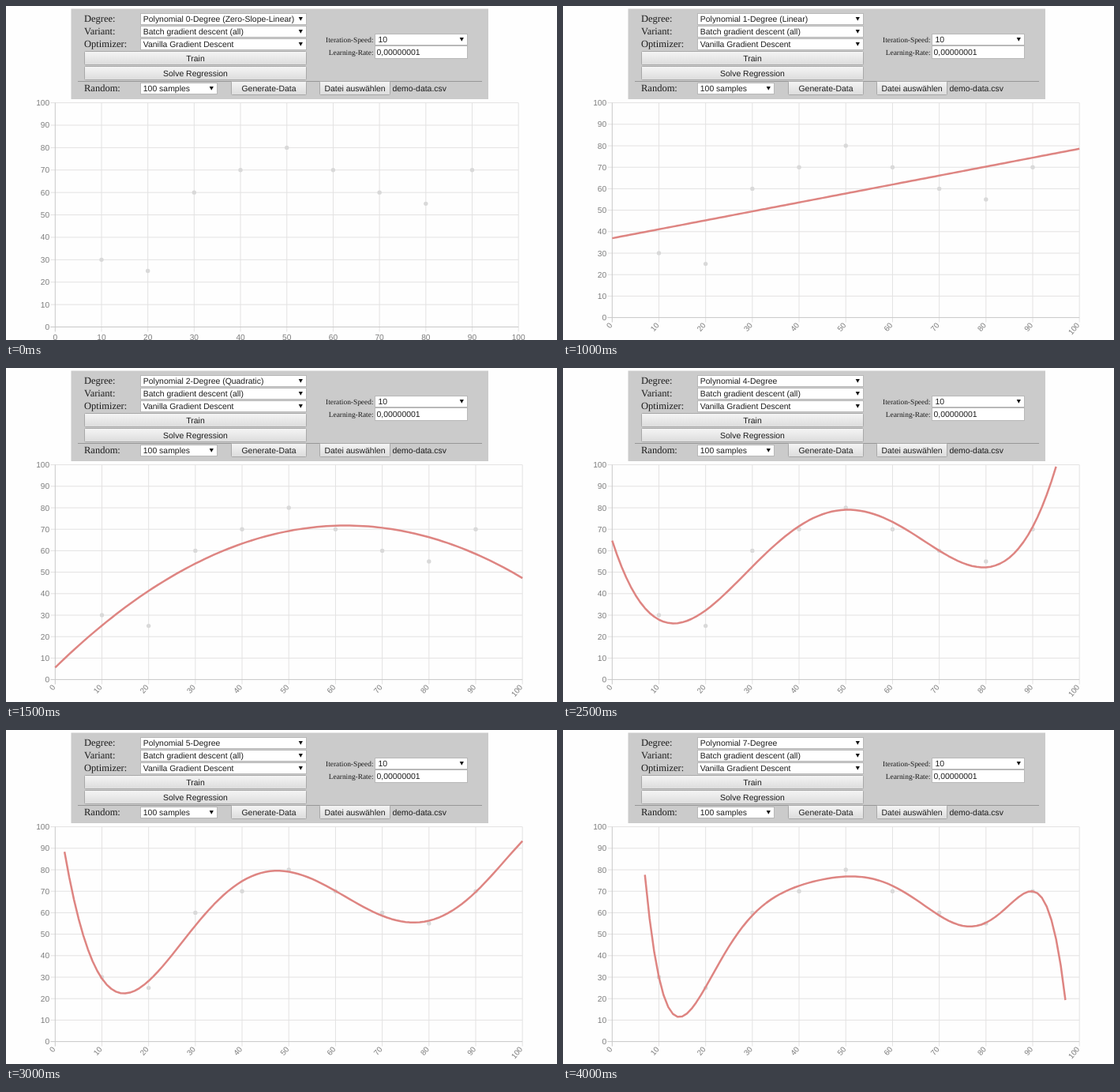
An HTML page that plays this animation: 698x423 px, repeating every 4.5 s.

```html
<!DOCTYPE html>
<html lang="en">
<head>
<meta charset="utf-8">
<title>Polynomial regression</title>
<style>
  html, body { margin: 0; width: 100%; height: 100%; overflow: hidden; background: #fefefe; }
  svg { display: block; }
  text { font: 10.45px Arial, "Liberation Sans", sans-serif; fill: #1c1c1c; white-space: pre; text-rendering: geometricPrecision; }
  .label { font: 12.5px "Times New Roman", "Liberation Serif", serif; }
  .small { font-size: 9.4px; }
  .tick { font-size: 10.2px; fill: #7c7c7c; }
  .slanted { font-size: 9.7px; }
  .grid { stroke: #e3e2e2; }
  .axis { stroke: #c8c8c8; }
  .rule { stroke: #979797; }
</style>
</head>
<body>
<svg id="stage" width="698" height="423" viewBox="0 0 698 423">
  <defs>
    <linearGradient id="face" x2="0" y2="1">
      <stop stop-color="#f5f5f5"/><stop offset="1" stop-color="#dcdcdc"/>
    </linearGradient>
  </defs>
</svg>
<script>
const STEP = 500, DEGREES = 8;
const LEFT = 62.3, TOP = 122.6;
const samples = [30, 25, 60, 70, 80, 70, 60, 55, 70].map((y, i) => [10 * (i + 1), y]);
const suffixes = [" (Zero-Slope-Linear)", " (Linear)", " (Quadratic)", " (Cubic)"];
const stage = document.getElementById("stage");

function add(parent, tag, attrs, content = "") {
  const node = document.createElementNS("http://www.w3.org/2000/svg", tag);
  for (const key in attrs) node.setAttribute(key, attrs[key]);
  node.textContent = content;
  return parent.appendChild(node);
}

function write(x, y, content, cls = "", anchor = "start", parent = stage) {
  return add(parent, "text", { x, y, class: cls, "text-anchor": anchor }, content);
}

function line(parent, x1, y1, x2, y2, cls) {
  add(parent, "line", { x1, y1, x2, y2, class: cls });
}

function field(x, y, width, height, content, { arrow = true, indent = 3.8 } = {}) {
  add(stage, "rect", { x: x + .5, y: y + .5, width: width - 1, height: height - 1, fill: "#fff", stroke: "#b8b8b8" });
  const middle = y + height / 2;
  if (arrow) {
    const tip = x + width - 7.7;
    add(stage, "path", { d: `M${tip - 2.6} ${middle - 2.6}h5.2l-2.6 4.8z`, fill: "#111" });
  }
  return write(x + indent, middle + 3.3, content);
}

function button(x, y, width, height, content) {
  add(stage, "rect", { x: x + .5, y: y + .5, width: width - 1, height: height - 1, rx: 1, fill: "url(#face)", stroke: "#a8a8a8" });
  write(x + width / 2, y + height / 2 + 3.6, content, "", "middle");
}

function drawForm() {
  add(stage, "rect", { x: 82.5, y: 3.5, width: 528.5, height: 114.5, fill: "#cbcbcb" });
  [["Degree:", 20], ["Variant:", 36], ["Optimizer:", 52], ["Random:", 108]]
    .forEach(([name, y]) => write(99, y, name, "label"));
  write(465.5, 45.5, "Iteration-Speed:", "label small", "end");
  write(465.5, 61.5, "Learning-Rate:", "label small", "end");
  line(stage, 91, 95.5, 603, 95.5, "rule");
  const degreeText = field(170, 9, 211, 15, "");
  field(170, 25, 211, 15, "Batch gradient descent (all)");
  field(170, 41, 211, 15, "Vanilla Gradient Descent");
  field(170, 97, 98, 15, "100 samples");
  field(467, 35, 118, 15, "10", { indent: 4.5 });
  field(467, 50, 118, 17, "0,00000001", { arrow: false, indent: 2.5 });
  button(99, 57, 282, 18, "Train");
  button(99, 76, 282, 18, "Solve Regression");
  button(285, 95, 96, 18, "Generate-Data");
  button(397, 95, 90, 18, "Datei auswählen");
  write(489.5, 107.6, "demo-data.csv");
  return degreeText;
}

function drawChart(right, bottom, slanted) {
  const group = add(stage, "g", {});
  const px = x => LEFT + (right - LEFT) * x / 100;
  const py = y => bottom + (TOP - bottom) * y / 100;
  for (let v = 100; v >= 0; v -= 10) {
    const x = px(v), y = py(v), cls = v ? "grid" : "axis";
    line(group, x, TOP, x, bottom + 6, cls);
    line(group, LEFT - 6, y, right, y, cls);
    write(55.2, y + 3.5, v, "tick", "end", group);
    if (slanted) {
      const label = write(0, 3.4, v, "tick slanted", "end", group);
      label.setAttribute("transform", `translate(${x - 2} ${bottom + 7.8}) rotate(-50)`);
    } else {
      write(x, bottom + 16.8, v, "tick", "middle", group);
    }
  }
  for (const [x, y] of samples)
    add(group, "circle", { cx: px(x), cy: py(y), r: 2.7, fill: "#d9d9d9" });
  return { group, px, py };
}

// Least squares through the normal equations, with x scaled to about -1..1.
function fit(degree) {
  const scale = x => (x - 50) / 40;
  const n = degree + 1, indices = [...Array(n).keys()];
  const sum = f => samples.reduce((total, [x, y]) => total + f(scale(x), y), 0);
  const rows = indices.map(i => [
    ...indices.map(j => sum(x => x ** (i + j))),
    sum((x, y) => y * x ** i)
  ]);
  for (let i = 0; i < n; i++)
    for (let k = 0; k < n; k++) {
      if (k === i) continue;
      const factor = rows[k][i] / rows[i][i];
      for (let j = i; j <= n; j++) rows[k][j] -= factor * rows[i][j];
    }
  const weights = rows.map((row, i) => row[n] / row[i]);
  return x => weights.reduceRight((total, w) => total * scale(x) + w, 0);
}

function curvePath(degree, { px, py }) {
  const model = fit(degree), points = [];
  for (let x = 0; x <= 100; x++) {
    const y = model(x);
    if (y >= 0 && y <= 100) points.push(`${px(x).toFixed(2)} ${py(y).toFixed(2)}`);
  }
  return "M" + points.join("L");
}

const degreeText = drawForm();
const emptyChart = drawChart(649.2, 406.5, false);
const fittedChart = drawChart(654.2, 394.6, true);
const curve = add(fittedChart.group, "path", { fill: "none", stroke: "#de8582", "stroke-width": 2.5, "stroke-linejoin": "round" });
const paths = Array.from({ length: DEGREES }, (_, degree) => curvePath(degree, fittedChart));

let shown = -1;
function render(time) {
  const scene = Math.floor(time / STEP) % (DEGREES + 1);
  if (scene === shown) return;
  shown = scene;
  const degree = Math.max(0, scene - 1);
  degreeText.textContent = `Polynomial ${degree}-Degree${suffixes[degree] || ""}`;
  emptyChart.group.style.display = scene ? "none" : "";
  fittedChart.group.style.display = scene ? "" : "none";
  curve.setAttribute("d", paths[degree]);
}

const start = performance.now();
function tick() {
  render(performance.now() - start);
  requestAnimationFrame(tick);
}
tick();
</script>
</body>
</html>
```
